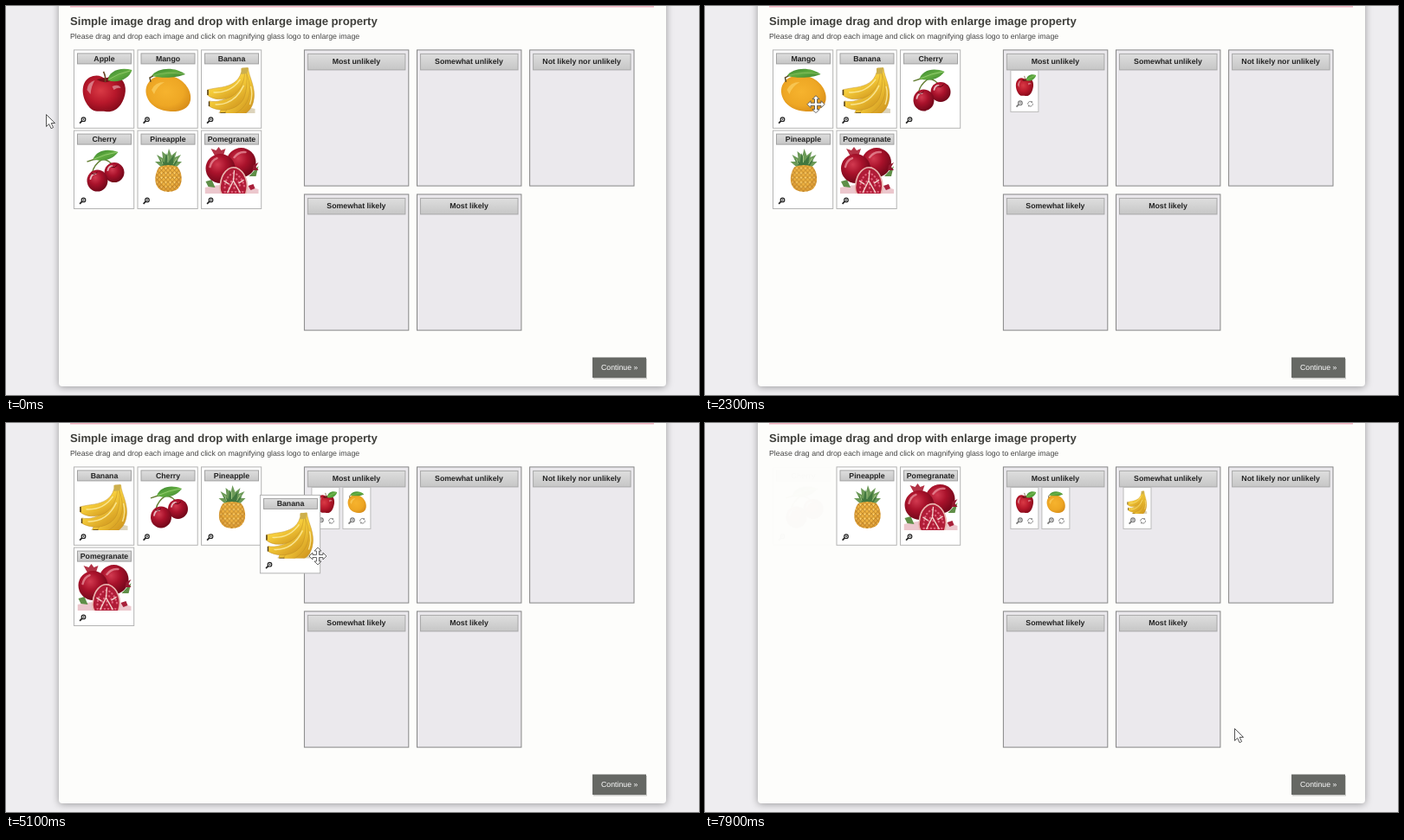
Write an HTML page that moves like this. It is 800x450 px and loops after 8 s.

```html
<!DOCTYPE html>
<html lang="en">
<head>
<meta charset="utf-8">
<title>Drag and drop fruit</title>
<style>
  html, body { margin: 0; width: 100%; height: 100%; overflow: hidden; background: #eeedf0; }
  .panel {
    position: absolute; left: 61px; top: -20px; width: 701px; height: 459.5px;
    border-radius: 4px; background: #fdfdfb; box-shadow: 0 1px 9px rgba(0, 0, 0, .36);
  }
  svg { position: absolute; left: 0; top: 0; display: block; }
  text {
    font: 8.75px "Liberation Sans", Arial, sans-serif;
    fill: #444; text-rendering: geometricPrecision;
  }
  .bold { font-weight: bold; fill: #222; text-anchor: middle; }
  .title { font-size: 13.12px; font-weight: bold; fill: #3f3f3b; }
</style>
</head>
<body>
<div class="panel"></div>
<svg id="stage" width="800" height="450" viewBox="0 0 800 450">
  <defs>
    <linearGradient id="bar" x2="0" y2="1">
      <stop stop-color="#dedede"/><stop offset="1" stop-color="#c6c6c6"/>
    </linearGradient>
    <radialGradient id="red" cx=".42" cy=".42" r=".62">
      <stop stop-color="#d93a45"/><stop offset=".55" stop-color="#b8182b"/><stop offset="1" stop-color="#850a1a"/>
    </radialGradient>
    <radialGradient id="dark" cx=".4" cy=".36" r=".68">
      <stop stop-color="#d23a50"/><stop offset=".45" stop-color="#a9122b"/><stop offset="1" stop-color="#6c0618"/>
    </radialGradient>
    <radialGradient id="gold" cx=".45" cy=".45" r=".6">
      <stop stop-color="#f6b32e"/><stop offset=".65" stop-color="#eea724"/><stop offset="1" stop-color="#d98f1a"/>
    </radialGradient>
    <linearGradient id="yellow" x2=".7" y2="1">
      <stop stop-color="#fbe060"/><stop offset=".55" stop-color="#f5cc3a"/><stop offset="1" stop-color="#d39a20"/>
    </linearGradient>
    <linearGradient id="green" x2="1" y2="1">
      <stop stop-color="#33802d"/><stop offset=".5" stop-color="#62ad40"/><stop offset="1" stop-color="#387f30"/>
    </linearGradient>
    <pattern id="rind" width="5" height="5.4" patternUnits="userSpaceOnUse">
      <rect width="5" height="5.400" fill="#f0b340"/>
      <path d="M0 0L5 5.400M5 0L0 5.400" stroke="#b5802c" stroke-width=".8"/>
      <circle cx="2.500" cy=".7" r=".7" fill="#fbe6a0"/>
    </pattern>
    <clipPath id="photo"><rect x="4" y="18" width="63" height="55"/></clipPath>

    <g id="Apple">
      <path d="M36 34C31 27 17 28 12 38C7 49 13 63 21 69C27 72.500 31 70 36 71C43 72 49 70 54 63C60 54 62 41 55 34C49 28 41 29 36 34Z" fill="url(#red)"/>
      <path d="M26 34Q36 31 46 33Q37 41 26 34Z" fill="#741018"/>
      <path d="M36 37Q37 31 34 25" fill="none" stroke="#6b4526" stroke-width="1.600"/>
      <path d="M39 35C40 25 52 19 67 23C64 33 51 39 39 35Z" fill="url(#green)"/>
      <path d="M40 34Q51 27 65 24" fill="none" stroke="#a5d27c" stroke-width=".7"/>
      <path d="M15 46Q16 37 24 35Q20 41 19 51ZM44 42Q52 39 54 44Q50 43 46 46Z" fill="#fff" opacity=".4"/>
    </g>
    <g id="Mango">
      <path d="M13 37C19 29 33 28 42 31C54 35 63 47 61 58C59 69 48 71.500 38 71C26 70 17 66 12 57C8 49 9 42 13 37Z" fill="url(#gold)"/>
      <path d="M16 30C23 20 43 19 55 28C46 32 29 33 16 30Z" fill="url(#green)"/>
      <path d="M17 30Q34 24 54 28" fill="none" stroke="#9ac66e" stroke-width=".6"/>
      <path d="M15 37L14 32L18 30" fill="none" stroke="#5a4a28" stroke-width="1.500"/>
      <path d="M16 46Q20 37 31 37Q22 42 19 51Z" fill="#ffe07a" opacity=".5"/>
    </g>
    <g id="Banana" clip-path="url(#photo)">
      <path d="M20 72Q40 62 62 68V74H20Z" fill="#b9a878" opacity=".5"/>
      <g fill="url(#yellow)" stroke="#bd8c24" stroke-width=".5">
        <path d="M47 21H54C55 32 64 44 60 60C58 68 53 74 46 75H22C20 70 24 66 32 64C44 58 46 40 47 21Z"/>
        <path d="M49 27C50 42 46 58 33 66C29 69 27 71 27 75H36C48 70 55 60 56 48C56 39 54 32 52 26Z"/>
        <path d="M47 27C45 44 38 54 24 58C18 60 13 60 9 59L9 65C22 73 42 70 49 56C53 46 53 34 52 26Z"/>
        <path d="M46 26C43 37 34 41 24 43C17 44 11 45 7 46L7 52C16 60 34 58 42 48C48 41 50 33 50 26Z"/>
      </g>
      <path d="M46 21L54 20L53 27L46 28Z" fill="#cdaf4c"/>
      <path d="M7.500 46V52M9 59.500V65M22 73H28" stroke="#54401c" stroke-width="1.500"/>
      <path d="M14 49Q34 50 45 34M16 63Q38 64 49 41M57 42Q60 52 56 63" fill="none" stroke="#fff3b0" stroke-width="1.400" opacity=".75"/>
    </g>
    <g id="Cherry">
      <path d="M15 36Q24 32 33 33Q23 39 21 49M32 33Q42 34 46 43" fill="none" stroke="#647f34" stroke-width="1.500"/>
      <path d="M22 33C26 23 38 20 51 25C44 34 33 37 22 33Z" fill="url(#green)"/>
      <path d="M23 33Q36 27 50 25" fill="none" stroke="#a9da84" stroke-width=".7"/>
      <ellipse cx="46.500" cy="48.500" rx="11.500" ry="11.500" fill="url(#dark)"/>
      <ellipse cx="27" cy="58" rx="12" ry="12.500" fill="url(#dark)"/>
      <path d="M19 56Q20 50 25 50M39 46Q40 41 44 41" fill="none" stroke="#fff" stroke-width="1.800" stroke-linecap="round" opacity=".7"/>
      <path d="M20 49Q23 52 27 48M43 42Q47 44 50 40" fill="none" stroke="#5c0510" stroke-width="1"/>
    </g>
    <g id="Pineapple">
      <path d="M28 43L20 36L26 36L22 28L29 32L28 24L34 29L36 21L39 29L45 24L43 31L50 28L45 36L51 36L44 43Z" fill="#6c9a58"/>
      <path d="M30 42L25 33L31 37L33 26L36 36L42 28L41 37L47 34L41 43Z" fill="#41773f"/>
      <path d="M29 39L27 33M35 37V29M41 39L45 32" stroke="#a4c584" stroke-width="1"/>
      <path d="M25 42C19 50 18 64 27 69Q35 73 44 69C53 64 52 49 46 42Q36 38 25 42Z" fill="url(#rind)"/>
      <path d="M25 42C19 50 18 64 27 69Q35 73 44 69C53 64 52 49 46 42Q50 60 36 66Q20 64 25 42Z" fill="#b8701c" opacity=".22"/>
    </g>
    <g id="Pomegranate" clip-path="url(#photo)">
      <path d="M4 66Q35 58 66 68V74H4Z" fill="#d9909c" opacity=".5"/>
      <path d="M55 53L66 41L63 53ZM5 59L12 57L16 66L8 65Z" fill="#5f8f48"/>
      <circle cx="46" cy="37" r="17" fill="url(#dark)"/>
      <path d="M60 40L66 37L63 42L66 46L59 46Z" fill="#92182e"/>
      <path d="M16 30L11 21L17 23L20 19L23 23L28 21L25 30Z" fill="#b23245"/>
      <circle cx="22" cy="44" r="17" fill="url(#dark)"/>
      <path d="M10 42Q12 34 18 32M38 31Q43 24 51 25" fill="none" stroke="#f7b0b8" stroke-width="2.400" stroke-linecap="round" opacity=".6"/>
      <path d="M22 62C23 50 31 41 40 43C50 47 56 60 51 74H24C21 70 21 66 22 62Z" fill="#b01c37" stroke="#e9b7b0" stroke-width="1.600"/>
      <g fill="none" stroke="#e0607a" stroke-width="2.200" stroke-linecap="round" stroke-dasharray=".5 3.600">
        <path d="M27 66Q28 52 38 49Q47 53 50 66"/><path d="M32 67Q34 56 39 55Q44 58 45 67"/><path d="M27 71H50M38 62V67"/>
      </g>
      <path d="M38 46L37 58L30 72M37 58L45 72M26 58L32 62M49 57L43 61" fill="none" stroke="#f3d6cf" stroke-width="1.300"/>
      <path d="M54 64L60 62L62 67L57 69Z" fill="#a8203a"/>
    </g>

    <g id="lens" fill="none" stroke="currentColor">
      <circle cx="5" cy="2.800" r="2.300" stroke-width="1.200"/>
      <path d="M3.300 4.500L.6 7.200" stroke-width="1.700"/>
      <path d="M4 2.800H6M5 1.800V3.800" stroke-width=".7"/>
    </g>
    <g id="reset" fill="none" stroke="#888" stroke-width="1">
      <path d="M.8 4.300A2.800 2.800 0 0 1 5.500 1.800M6.400 3.300A2.800 2.800 0 0 1 1.700 5.900"/>
      <path d="M4.100 2.400L6.300 2.500L5.900 .4ZM3.100 5.300L.9 5.200L1.300 7.300Z" fill="#888" stroke="none"/>
    </g>
  </defs>

  <rect x="74" y="-1" width="674" height="2.500" fill="#f3b4c2"/>
  <text class="title" x="74" y="22.300">Simple image drag and drop with enlarge image property</text>
  <text x="74" y="38.200">Please drag and drop each image and click on magnifying glass logo to enlarge image</text>
  <g id="buckets"></g>
  <rect x="678" y="408" width="62" height="23.500" fill="#000" opacity=".2"/>
  <rect x="677" y="406.500" width="62" height="23.500" fill="#666864"/>
  <text x="687" y="421.300" style="fill:#fff">Continue »</text>
  <g id="cards"></g>
  <g id="cursor">
    <path id="arrow" d="M.5 .5V14.500L3.700 11.500L6.100 16.700L8.600 15.500L6.200 10.500H10.600Z" fill="#fff" stroke="#555" stroke-width="1"/>
    <path id="move" d="M0-10L4-6H1.500V-1.500H6V-4L10 0L6 4V1.500H1.500V6H4L0 10L-4 6H-1.500V1.500H-6V4L-10 0L-6-4V-1.500H-1.500V-6H-4Z" fill="#fff" stroke="#555" stroke-width=".9"/>
  </g>
</svg>
<script>
const LOOP = 8000, FRAME = 100, FADE = 600;
const $ = id => document.getElementById(id);

// pick: drag starts, drop: helper vanishes, fade: list card starts to fade
const fruits = [
  { name: 'Apple', hover: 700, pick: 900, drop: 1400, fade: 1400, bucket: 0, slot: 0 },
  { name: 'Mango', hover: 1800, pick: 3200, drop: 3700, fade: 3850, bucket: 0, slot: 1 },
  { name: 'Banana', hover: 4500, pick: 4700, drop: 5462, fade: 5480, bucket: 1, slot: 0 },
  { name: 'Cherry', hover: 6600, pick: 6850, drop: 7150, fade: 7330 },
  { name: 'Pineapple' },
  { name: 'Pomegranate' }
];
const labels = ['Most unlikely', 'Somewhat unlikely', 'Not likely nor unlikely', 'Somewhat likely', 'Most likely'];

// Pointer stops: time, x, y
const stops = [
  [0, 46, 125], [400, 31, 128], [750, 112, 112], [900, 112, 112], [1400, 400, 150],
  [1860, 128, 115], [3000, 128, 111], [3200, 128, 111], [3700, 410, 168], [3900, 410, 168],
  [4500, 145, 121.5], [4700, 145, 121.5], [5462, 545, 182], [5600, 545, 180], [6350, 21, 130],
  [6700, 127, 123], [6850, 127, 123], [7130, 685, 150], [7200, 650, 165], [7800, 611, 353]
];

const bucketAt = i => [344.4 + i % 3 * 130.1, 50.9 + Math.floor(i / 3) * 167];
const cardAt = i => [78.5 + i % 3 * 73.5, 50.9 + Math.floor(i / 3) * 93.2];
const swing = u => .5 - Math.cos(Math.PI * u) / 2;
const smooth = u => u * u * (3 - 2 * u);
const clamp = u => Math.min(1, Math.max(0, u));

function box(x, y, w, h, fill, stroke) {
  return `<rect x="${x}" y="${y}" width="${w}" height="${h}" fill="${fill}" stroke="${stroke}"/>`;
}

function addGroup(parent, html) {
  const g = document.createElementNS('http://www.w3.org/2000/svg', 'g');
  g.innerHTML = html;
  return parent.appendChild(g);
}

function place(g, [x, y], opacity = 1) {
  g.setAttribute('transform', `translate(${x} ${y})`);
  g.setAttribute('opacity', opacity);
}

const cardHtml = name => box(0, 0, 69.2, 90.4, '#fff', '#b4b4b4') +
  box(4, 4, 62, 12, 'url(#bar)', '#a2a2a2') +
  `<text class="bold" x="35" y="13">${name}</text><use href="#${name}"/>
   <use href="#lens" x="6" y="77.500" color="#222"/>`;

const miniHtml = name => box(0, 0, 32, 48, '#fff', '#bbb') +
  `<use href="#${name}" transform="translate(1.800 -6) scale(.41 .5)"/>
   <use href="#lens" x="6" y="35" color="#777"/><use href="#reset" x="19" y="35"/>`;

labels.forEach((label, i) => {
  const g = addGroup($('buckets'), box(0, 0, 120.4, 157.2, '#ebe9ed', '#858585') +
    box(4, 4.5, 112.5, 18.5, 'url(#bar)', '#a9a9a9') +
    `<text class="bold" x="60" y="16.600">${label}</text>`);
  place(g, bucketAt(i));
});

for (const f of fruits) {
  f.card = addGroup($('cards'), cardHtml(f.name));
  if (f.bucket === undefined) continue;
  const [x, y] = bucketAt(f.bucket);
  f.mini = addGroup($('cards'), miniHtml(f.name));
  place(f.mini, [x + 8.5 + f.slot * 36, y + 23.5]);
}
for (const f of fruits) if (f.pick) f.helper = addGroup($('cards'), cardHtml(f.name));

function pointer(t) {
  const i = stops.findIndex(s => s[0] > t);
  if (i < 0) return stops[stops.length - 1].slice(1);
  const [t0, x0, y0] = stops[i - 1], [t1, x1, y1] = stops[i];
  const k = smooth((t - t0) / (t1 - t0));
  return [x0 + (x1 - x0) * k, y0 + (y1 - y0) * k];
}

function show(g, on) { g.style.display = on ? '' : 'none'; }

function draw(t) {
  const [px, py] = pointer(t);
  let index = 0;
  for (const f of fruits) {
    const gone = t >= f.fade + FADE;
    show(f.card, !gone);
    if (f.mini) show(f.mini, gone);
    if (!gone) place(f.card, cardAt(index++), f.fade ? 1 - swing(clamp((t - f.fade) / FADE)) : 1);
    if (!f.helper) continue;
    const [gx, gy] = pointer(f.pick), [x, y] = cardAt(0);
    show(f.helper, t > f.pick && t < f.drop);
    place(f.helper, [x + px - gx, y + py - gy]);
  }
  const moving = fruits.some(f => t >= f.hover && t < f.drop);
  show($('move'), moving);
  show($('arrow'), !moving);
  place($('cursor'), [px, py]);
}

const start = performance.now();
function tick() {
  const t = (performance.now() - start) % LOOP;
  draw(Math.floor(t / FRAME) * FRAME);
  requestAnimationFrame(tick);
}
tick();
</script>
</body>
</html>
```
